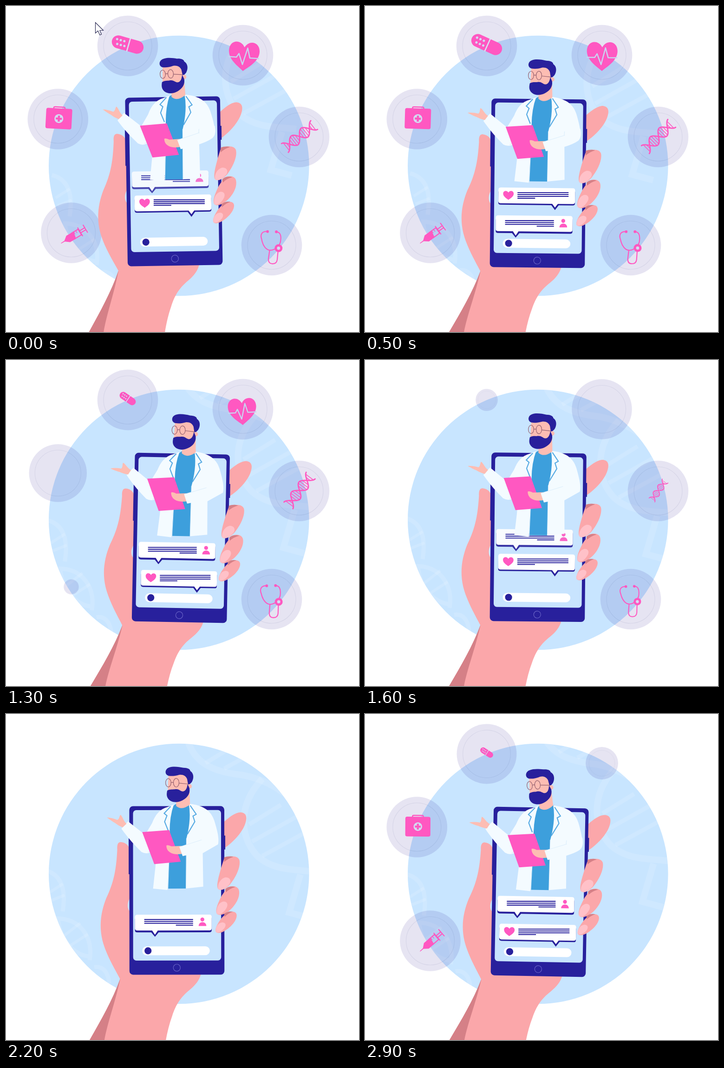
An HTML page for the animation above (3000 ms loop, 760 by 702 pixels).

```html
<!DOCTYPE html>
<html lang="en">
<head>
<meta charset="utf-8">
<title>Doctor on the phone</title>
<style>
  html, body { margin: 0; width: 100%; height: 100%; overflow: hidden; background: #fff; }
  svg { display: block; width: 760px; height: 702px; }
  .badge { mix-blend-mode: multiply; fill: #e6e4f2; stroke: none; }
  .badge .ring { fill: none; stroke: #d7d6e8; stroke-width: 1.2; }
  .pink { fill: #ff58c1; }
  .line { fill: none; stroke: #ff58c1; stroke-linecap: round; stroke-linejoin: round; }
  .pale { fill: #d3dcf2; }
  .navy { fill: #28209c; }
  .skin { fill: #fba7aa; }
  .face { fill: #fdbdb3; }
  .dark { fill: #d58087; }
  .nail { fill: #ffc1c8; }
  .coat { fill: #f4fbff; }
  .blue { fill: #3d9fdc; }
  .white { fill: #fff; }
  .text { fill: none; stroke: #28209c; stroke-width: 2.1; }
  .helix { fill: none; stroke: #fff; stroke-opacity: .13; stroke-width: 14; }
</style>
</head>
<body>
<svg viewBox="0 0 760 702">
  <defs>
    <clipPath id="disc"><circle cx="372.3" cy="344" r="280.3"/></clipPath>
    <path id="love" d="M0 34C-10 25-33 12-33-9C-33-31-9-35 0-17C9-35 33-31 33-9C33 12 10 25 0 34Z"/>
  </defs>
  <rect class="white" width="760" height="702"/>
  <circle cx="372.3" cy="344" r="280.3" fill="#c8e5ff"/>
  <g clip-path="url(#disc)">
    <g id="helixRight" class="helix">
      <path d="M392 60C410 112 455 126 510 132C580 145 630 190 665 240"/>
      <path d="M552 140C500 195 502 262 540 305C575 338 620 335 665 340"/>
      <path d="M655 440L610 428L634 346"/>
      <path d="M430 106L492 68M470 118L530 85M524 238L592 196M530 275L632 218M552 306L655 250" stroke-width="9"/>
    </g>
    <g id="helixLeft" class="helix">
      <path d="M84 336C118 345 130 375 122 425M108 440C160 440 188 480 180 530M112 440C116 490 150 520 180 522M190 545C208 542 220 555 222 580" stroke-width="9"/>
      <path d="M92 385L122 366M96 402L126 390M124 478L160 450M136 500L176 474" stroke-width="6"/>
    </g>
  </g>

  <g id="badges"></g>

  <g id="pill">
    <rect class="pink" x="-35" y="-14" width="70" height="28" rx="14"/>
    <path d="M2-15V15" stroke="#dbe2f5" stroke-width="2.6"/>
    <g class="pale" id="dots"></g>
  </g>
  <g id="heart">
    <use href="#love" class="pink"/>
    <path d="M-33 5H-16L-11-3L-2 20L7-16L13 5H33" fill="none" stroke="#c8d5f1" stroke-width="2.5" stroke-linejoin="round"/>
  </g>
  <g id="dna" class="line"></g>
  <g id="scope">
    <path class="line" stroke-width="2.2" d="M-10-29C-22-30-26-22-22-12C-19 3-11 11-3 11C7 11 19 1 19-12C20-22 17-29 9-29M-4 11L-6 30Q-6 40 3 40Q12 40 13 31L14 14"/>
    <circle class="pink" cx="-10" cy="-29" r="3"/><circle class="pink" cx="9" cy="-29" r="3"/>
    <circle class="pink" cx="15" cy="6" r="8.5"/><circle class="pale" cx="15" cy="6" r="3.4"/>
  </g>
  <g id="syringe">
    <path class="pink" d="M0-.6L9-1L18-8H31V8H18L9 1L0 .6ZM29-8L36-8L33 8H29Z"/>
    <path class="line" stroke-width="2.2" d="M30-7H47V7H30M48-10V10M49-2.5H60M49 2.5H60M61-9V9"/>
    <path class="line" stroke-width="1.4" d="M36-7V-2M41-7V-2"/>
  </g>
  <g id="kit">
    <rect class="pink" x="-28" y="-22" width="56" height="44" rx="4"/>
    <path class="line" stroke-width="2.6" d="M-12-21V-23Q-12-25-9-25H9Q12-25 12-23V-21"/>
    <circle class="pale" r="9.6"/>
    <path class="line" stroke-width="4.4" style="stroke-linecap:butt" d="M-6.5 0H6.5M0-6.5V6.5"/>
  </g>

  <g id="scene">
    <path class="dark" d="M169 722L180 702C204 660 230 615 246 570L262 600L226 722Z"/>
    <path class="skin" d="M240 292C239 279 243 275 249 276C259 277 266 284 268 296L300 400L470 500L420 560C417 573 408 584 396 594C376 610 366 626 358 650C349 674 344 702 341 722H209C214 675 232 635 246 571C231 543 216 518 208 488C200 455 205 425 216 397C234 360 238 330 240 292Z"/>
    <path d="M268 396C261 404 260 420 268 426Z" fill="#c8e5ff"/>
    <path class="skin" d="M468 234C480 223 495 211 507 212C519 214 520 224 515 238C508 257 488 278 468 291Z"/>

    <path class="navy" d="M264.500 265H268V345H264.500ZM468 262H472.500V292H468Z"/>
    <rect class="navy" x="266" y="198.500" width="204.500" height="363" rx="8"/>
    <rect x="274" y="207" width="189.500" height="324" rx="7" fill="#c8e4fe"/>
    <circle cx="368" cy="546.500" r="7.600" fill="none" stroke="#6963c6" stroke-width="1.200"/>
    <rect class="white" x="293.500" y="500.500" width="145.500" height="19" rx="9.500"/>
    <circle class="navy" cx="306" cy="510" r="7.600"/>

    <g id="user">
      <path class="navy" d="M283 4H438Q443 4 443 9V34Q443 38 438 38H329L321 47.500L313 38H283Q278 38 278 34V9Z"/>
      <path class="white" d="M283 0H438Q443 0 443 5V29Q443 34 438 34H327L321 43L315 34H283Q278 34 278 29V5Q278 0 283 0Z"/>
      <path class="text" d="M298 10.500H403M298 14.600H403M298 18.700H403M366 22.600H403"/>
      <circle class="pink" cx="423" cy="10.500" r="4.200"/>
      <path class="pink" d="M415 24.500C415 13.500 431.500 13.500 431.500 24.500Z"/>
    </g>
    <g id="like">
      <path class="navy" d="M288 4H443Q448 4 448 9V33Q448 37 443 37H413L405 47.500L397 37H288Q283 37 283 33V9Z"/>
      <path class="white" d="M288 0H443Q448 0 448 5V29Q448 34 443 34H411L405 42L399 34H288Q283 34 283 29V5Q283 0 288 0Z"/>
      <path class="text" d="M324 10.400H434M324 14.400H434M324 18.400H434M324 22.200H362"/>
      <use href="#love" class="pink" transform="translate(304.500 16) scale(.345 .31)"/>
    </g>

    <path class="skin" d="M470 312C484 304 500 305 503 315C506 330 495 352 483 367C474 377 463 382 457 377C452 369 460 345 464 330Z"/>
    <path class="dark" d="M470 309C477 306 485 306 490 308Q479 311 470 319Z"/>
    <path class="nail" d="M457 377C455 366 463 354 473 352C482 352 486 358 482 366C475 376 463 382 457 377Z"/>
    <path class="skin" d="M477 374C488 368 500 371 502 380C505 395 494 412 483 422C471 432 459 436 454 430C450 421 458 405 465 391Z"/>
    <path class="dark" d="M472 378C478 371 488 371 494 373Q482 376 474 384Z"/>
    <path class="nail" d="M454 430C452 418 459 405 469 404C477 404 479 411 475 418C468 430 459 435 454 430Z"/>
    <path class="skin" d="M472 432C483 423 497 424 497 434C497 445 486 457 476 464C465 472 455 474 452 469C449 462 459 446 466 438Z"/>
    <path class="dark" d="M470 431C476 425 484 425 489 426Q479 429 471 437Z"/>
    <path class="nail" d="M452 469C450 459 458 449 467 449C475 450 474 457 470 462C463 470 455 473 452 469Z"/>

    <g id="doctor">
      <path class="blue" d="M354 202L368 193H396L400 260L388 376H349Z"/>
      <path class="coat" d="M362 195L349 200C331 205 322 217 315 235L299 262L325 290L322 330L317 376L348 379L353 270Q351 225 362 195ZM394 193L410 196C432 202 443 212 449 230C455 250 460 268 457 281L424 300L425 372L388 376L389 268Q400 225 394 193Z"/>
      <path class="coat" d="M263 231L302 262L326 250L320 292Q306 305 292 297Q267 273 249 247Z"/>
      <path d="M306 298Q317 292 327 268M389 268L388 376M353 265L349 378M424 268L422 290" fill="none" stroke="#dceefb" stroke-width="1.200"/>
      <path d="M355 199L341 214L347 219L342 232L350 252M397 197L410 216L403 220L407 232L391 259" fill="none" stroke="#58abe3" stroke-width="2.200"/>
      <path id="wave" class="face" d="M252 245C244 243 239 241 234 238C226 235 219 231 215 229C222 228 230 229 238 231C242 229 241 223 243 219C248 221 251 231 259 236Z"/>
      <g id="head">
        <path class="face" d="M367 178L367 198Q379 209 397 195L396 160Z"/>
        <path class="face" d="M351 130H392L396 170L372 180L349 170Z"/>
        <circle class="face" cx="396" cy="156" r="5"/>
        <path class="navy" d="M351 133C342 130 343 118 353 115C362 112 374 114 383 116C392 116 398 119 398 123C406 128 406 139 401 147L397 151L393 152L391 140C388 133 382 130 374 131C364 134 358 134 351 133Z"/>
        <path class="navy" d="M348 165C354 161 361 163 365 162C374 161 376 167 382 167C389 166 391 158 392 151L396 160C398 173 390 181 381 186C368 193 354 190 349 181C346 176 347 170 348 165Z"/>
        <g fill="none" stroke="#94606f" stroke-width="1.200">
          <ellipse cx="350.500" cy="148" rx="5.800" ry="9"/><ellipse cx="367.500" cy="148" rx="6" ry="9.300"/>
          <path d="M356.500 148Q359 146 361.500 148M373.500 149L393 151"/>
        </g>
      </g>
      <g id="board">
        <path class="pink" d="M297 259L355 255L380 323L323 328Z"/>
        <path class="face" d="M349 288Q352 286 360 290L382 289L384 306Q366 309 357 303Q349 298 349 288Z"/>
        <path class="coat" d="M377 291L425 276L432 252L458 262Q462 280 453 288Q435 301 384 311Z"/>
        <path d="M378 291L425 276" fill="none" stroke="#dceefb"/>
      </g>
    </g>
  </g>
  <path id="cursor" class="white" stroke="#2b2b55" stroke-width="1.200" d="M0 0V23L5.500 18L9.500 27L13 25.500L9.500 17H17Z"/>
</svg>

<script>
const $ = id => document.getElementById(id);
const NS = 'http://www.w3.org/2000/svg';
const LOOP = 3000, STEP = 100;
const { PI, sin, cos, exp, min, max, floor } = Math;

function add(parent, tag, attrs) {
  const el = document.createElementNS(NS, tag);
  for (const k in attrs) el.setAttribute(k, attrs[k]);
  return parent.appendChild(el);
}
const move = (el, transform) => el.setAttribute('transform', transform);
const show = (el, on) => el.style.visibility = on ? 'visible' : 'hidden';

const clamp = x => min(max(x, 0), 1);
const ease = x => (x = clamp(x), x * x * (3 - 2 * x));
const easeOut = (x, power) => 1 - (1 - clamp(x)) ** power;
const spring = t => t <= 0 ? 0 : 1 - exp(-t / 60) * cos(2 * PI * t / 270);

// Smooth curve through values spread evenly over the loop
function curve(t, v) {
  const n = v.length - 1, x = t / LOOP * n, i = min(floor(x), n - 1), u = x - i;
  const at = j => v[min(max(j, 0), n)], slope = j => (at(j + 1) - at(j - 1)) / 2;
  return at(i) + (at(i + 1) - at(i)) * ease(u)
    + slope(i) * u * (1 - u) ** 2 - slope(i + 1) * u * u * (1 - u);
}

// Badges in the order they leave and return; dx, dy place the icon's anchor
const items = [
  { id: 'syringe', x: 140.5, y: 488.5, dx: -22, dy: 22.5, tilt: -31, swing: -13 },
  { id: 'kit', x: 111.8, y: 243.5, dx: 2, dy: -1, tilt: 3, swing: -3.5 },
  { id: 'pill', x: 262, y: 86, dx: 0, dy: -3, tilt: 16, swing: 22 },
  { id: 'heart', x: 510, y: 106, dx: 0, dy: 34, lift: -34, tilt: 4, swing: -8 },
  { id: 'dna', x: 631, y: 282, dx: 1, dy: -1, tilt: -38, swing: -18 },
  { id: 'scope', x: 572, y: 515, dx: 0, dy: 0, tilt: 2, swing: -4 }
];
for (const b of items) {
  b.disc = add($('badges').parentNode, 'g', { class: 'badge' });
  $('badges').before(b.disc);
  add(b.disc, 'circle', { r: 65.3 });
  add(b.disc, 'circle', { r: 52, class: 'ring' });
}

for (let i = 0; i < 6; i++)
  add($('dots'), 'circle', { cx: -25 + 8 * (i % 3) + 3 * (i > 2), cy: i > 2 ? 5 : -5, r: 2.5 });

const strand = x => 12 * sin(PI * x / 27);
for (const sign of [1, -1]) {
  let d = '';
  for (let x = -40; x <= 40; x += 2.5) d += `${d ? 'L' : 'M'}${x} ${(sign * strand(x)).toFixed(1)}`;
  add($('dna'), 'path', { d, 'stroke-width': 2.8 });
}
for (let x = 6; x < 40; x += 5)
  for (const s of [x, -x]) add($('dna'), 'path', { d: `M${s} ${-strand(s)}V${strand(s)}`, 'stroke-width': 1.6 });

function drawBadge(b, i, t) {
  const out = t - 1110 - 160 * i, back = t - 2270 - 200 * i;
  const disc = back > 0 ? spring(back) : 1 - clamp(out / 230) ** 1.5;
  const icon = back > 0 ? easeOut((back - 160) / 400, 3) : easeOut(-out / 420, 2.2);
  const tilt = b.tilt + b.swing * sin(PI * t / 4000);
  show(b.disc, disc > 0);
  show($(b.id), icon > 0);
  move(b.disc, `translate(${b.x} ${b.y}) scale(${disc})`);
  move($(b.id), `translate(${b.x + b.dx} ${b.y + b.dy}) rotate(${tilt}) scale(${icon}) translate(0 ${b.lift || 0})`);
}

// On each beat the messages move up one place, then the next one pops up below
const BEATS = [-60, 820, 1580, 2270], POP = 200, CLEAR = 1700;
const bubbles = [{ id: 'user', tail: 321, births: [-2, 0, 2] }, { id: 'like', tail: 405, births: [-1, 1, 3] }];
const shift = (n, t) => n < 0 ? 1 : n < BEATS.length ? ease((t - BEATS[n]) / 500 + .5) : 0;

function drawBubble({ id, tail, births }, t, angle) {
  const born = births.filter(n => n < 0 || t > BEATS[n] + POP).pop();
  const leave = shift(born + 2, t), tip = 47.5;
  const y = 450 - 60 * shift(born + 1, t) - 48 * leave;
  const size = born < 0 ? 1 : spring(t - BEATS[born] - POP);
  const kept = born < 2 ? 1 - ease((t - CLEAR) / 250) : 1;
  $(id).setAttribute('opacity', (1 - leave ** 4) * kept);
  move($(id), `translate(${tail} ${y + tip}) scale(${size}) translate(${-tail} ${-tip})`);
  move($(id).querySelector('.text'), `rotate(${-angle} 365 16)`);
}

function draw(t) {
  const sway = curve(t, [-.9, .6, 1.4, .75, 0, .15, 1.2]);
  const nod = curve(t, [-2, 0, 0, 0, .5, -2.5, -7]);
  const lift = 6 * max(0, cos(PI * (t - 1700) / 2400));
  const drift = (1 + cos(PI * t / 2100)) / 2;

  items.forEach((b, i) => drawBadge(b, i, t));
  bubbles.forEach(b => drawBubble(b, t, sway));

  move($('scene'), `rotate(${sway} 210 813)`);
  move($('head'), `rotate(${nod} 380 222)`);
  move($('wave'), `rotate(${9 * cos(2 * PI * (t + 100) / 2200)} 258 243)`);
  move($('board'), `translate(${-.7 * lift} ${-lift})`);
  move($('helixRight'), `translate(${-40 * drift} ${-75 * drift})`);
  move($('helixLeft'), `translate(${15 * drift} ${28 * drift})`);

  show($('cursor'), t < 400);
  move($('cursor'), `translate(${192.5 - t / 60} ${35.5 - t * .09})`);
}

const start = performance.now();
function tick() {
  const t = (performance.now() - start) % LOOP;
  draw(floor(t / STEP) * STEP);
  requestAnimationFrame(tick);
}
tick();
</script>
</body>
</html>
```
